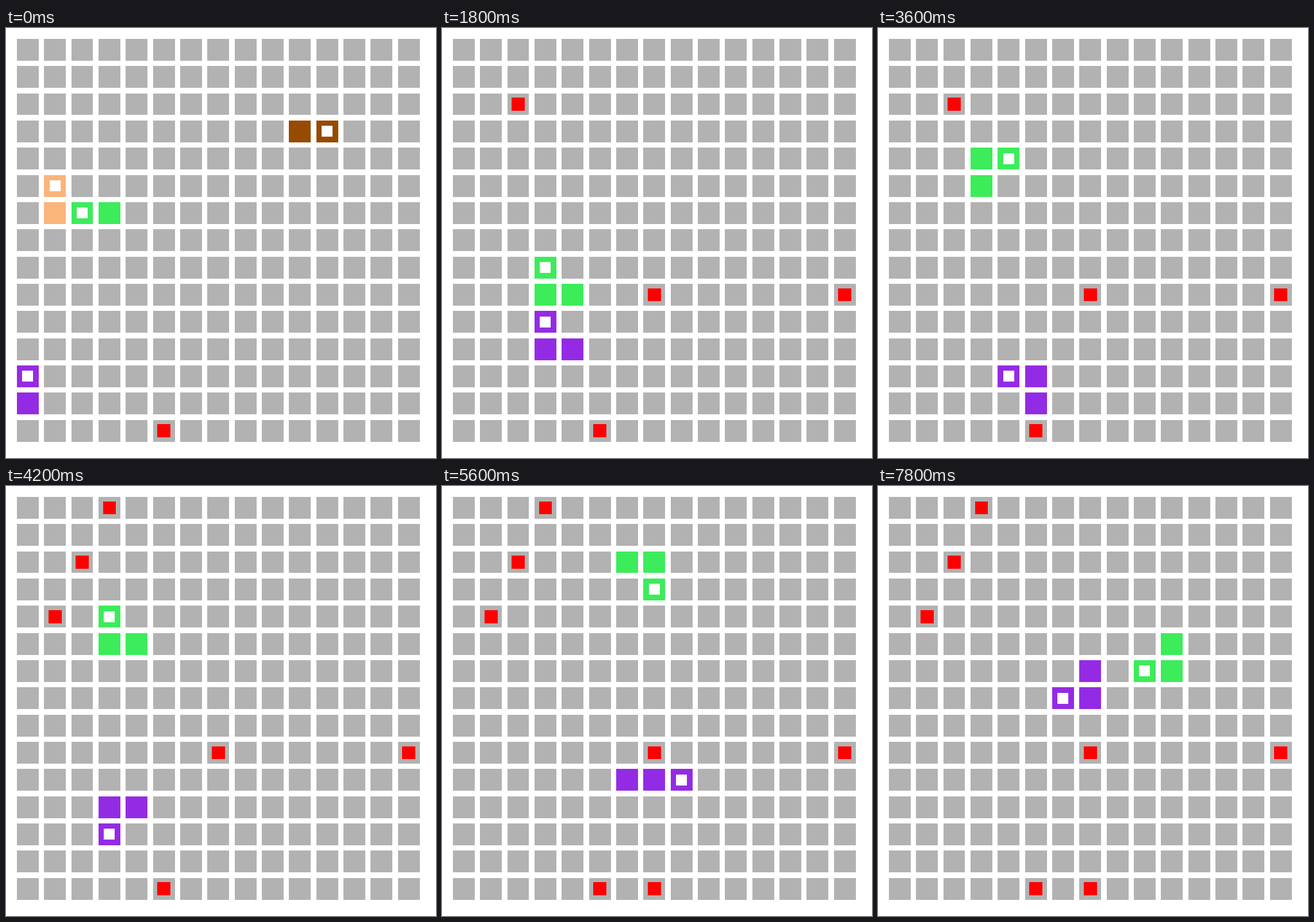
Animation of 748 by 748 pixels, one loop 8000 ms. Source, as an HTML page with a canvas:

```html
<!DOCTYPE html>
<html lang="en">
<head>
<meta charset="utf-8">
<title>Snakes</title>
<style>
  html, body { margin: 0; width: 100%; height: 100%; overflow: hidden; background: #fff; }
  canvas { display: block; width: 748px; height: 748px; }
</style>
</head>
<body>
<canvas id="board" width="748" height="748"></canvas>
<script>
const ctx = document.getElementById('board').getContext('2d');
const SIZE = 748, CELLS = 15, STEP_MS = 200, STEPS = 40, LENGTH = 3;
const unit = SIZE / 79;            // cell = 4 units, gap = 1, margin = 2
const DIRS = { U: [0, -1], D: [0, 1], L: [-1, 0], R: [1, 0] };

// Each snake starts coiled on one cell and makes one move per step.
const snakes = [
  { color: '#fab57a', start: [1, 6], moves: 'UU' },
  { color: '#964b00', start: [10, 3], moves: 'RR' },
  { color: '#3cec5a', start: [3, 6], moves: 'LDDDRURDLURULURULURDLURURURRDRDRDRDRULDL' },
  { color: '#942be4', start: [0, 13], moves: 'URURRURDLURDLDRDRULULDRURURRRRULULURULDL' }
];
for (const snake of snakes) {
  snake.path = [snake.start];
  for (const move of snake.moves) {
    const [x, y] = snake.path[snake.path.length - 1];
    const [dx, dy] = DIRS[move];
    snake.path.push([x + dx, y + dy]);
  }
}

// column, row, step of appearance
const food = [[5, 14, 0], [2, 2, 2], [14, 9, 4], [7, 9, 8], [3, 0, 20], [1, 4, 20], [7, 14, 26]];

const snap = v => Math.round(v - 0.01);

function square([col, row], color, scale = 1) {
  const inset = 2 + 2 * (1 - scale);
  const edge = (i, extra) => snap((i * 5 + inset + extra) * unit);
  const x = edge(col, 0), y = edge(row, 0);
  ctx.fillStyle = color;
  ctx.fillRect(x, y, edge(col, 4 * scale) - x, edge(row, 4 * scale) - y);
}

function draw(step) {
  ctx.fillStyle = '#fff';
  ctx.fillRect(0, 0, SIZE, SIZE);
  for (let row = 0; row < CELLS; row++)
    for (let col = 0; col < CELLS; col++) square([col, row], '#b2b2b2');

  for (const [col, row, from] of food)
    if (step >= from) square([col, row], '#f00', 0.6);

  for (const { color, moves, path } of snakes) {
    if (step >= moves.length) continue;
    const head = step + 1;
    for (let i = 0; i < LENGTH; i++) square(path[Math.max(0, head - i)], color);
    square(path[head], '#fff', 0.5);
  }
}

let shown = -1;
function tick() {
  const step = Math.floor(performance.now() / STEP_MS) % STEPS;
  if (step !== shown) draw(shown = step);
  requestAnimationFrame(tick);
}
tick();
</script>
</body>
</html>
```
